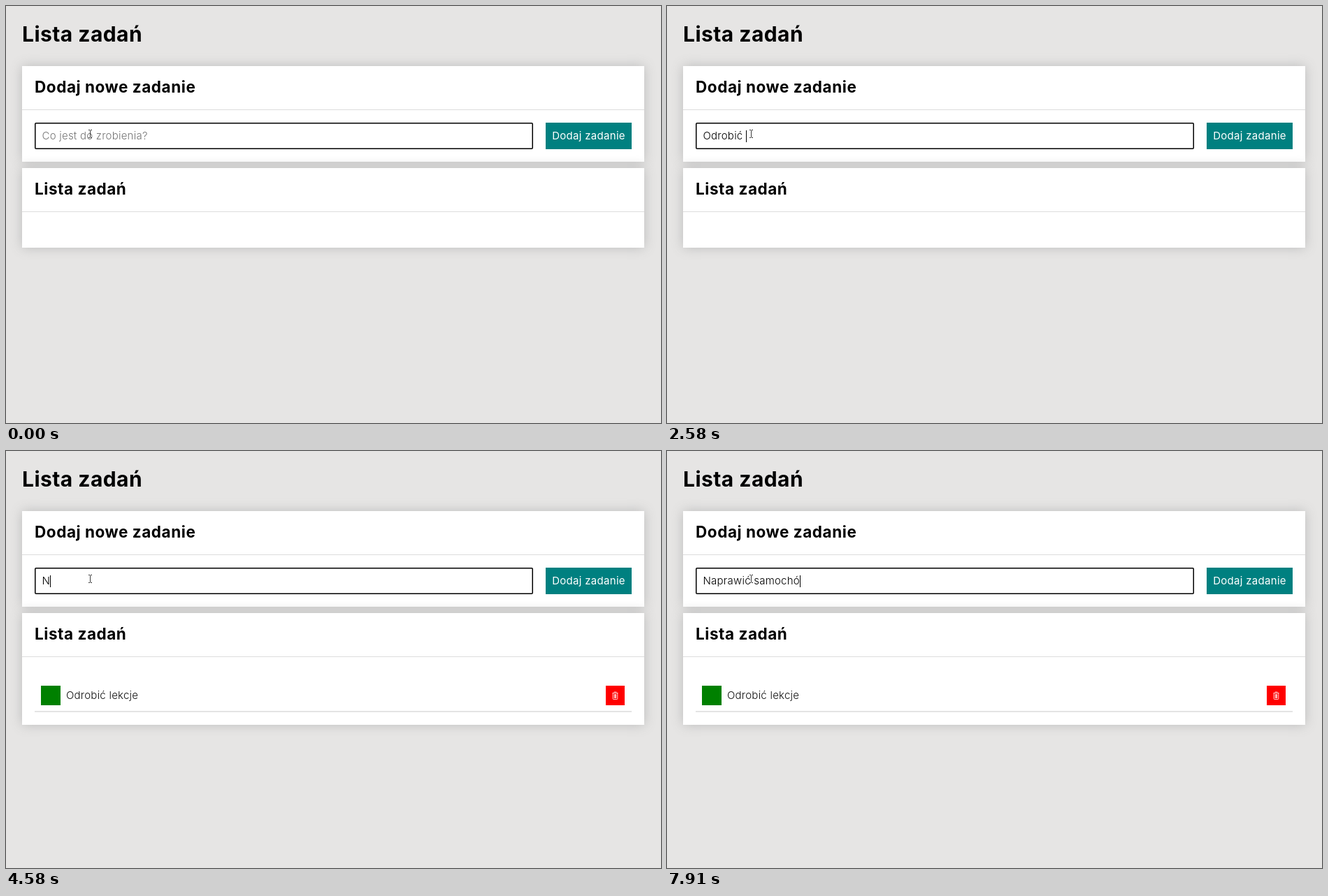
Animation of 937x597 px, one loop 8000 ms. Source, as an HTML page:

```html
<!DOCTYPE html>
<html lang="pl">
<head>
<meta charset="utf-8">
<title>Lista zadań</title>
<style>
  html, body { margin: 0; width: 100%; height: 100%; overflow: hidden; background: #e6e5e4; }
  body { position: relative; font: 300 15px Inter, sans-serif; letter-spacing: .23px; color: #000; }
  body *, h1, h2 { box-sizing: border-box; margin: 0; white-space: pre; }
  h1, section, .abs { position: absolute; }
  h1 { left: 23px; top: 20px; font-size: 30px; font-weight: 700; line-height: 41px; letter-spacing: .45px; }
  section { left: 23px; width: 890px; background: #fff; box-shadow: 0 0 16px #bbb; }
  h2 { height: 63px; padding-left: 18px; border-bottom: 1px solid #ddd;
       font-size: 22.5px; font-weight: 700; line-height: 60px; letter-spacing: .55px; }
  #field { left: 18px; top: 81px; width: 713px; height: 38px; padding: 2px 0 0 10.5px;
           border-radius: 2px; box-shadow: inset 0 0 0 1.5px #000; line-height: 33px; }
  #caret { display: inline-block; width: 1px; height: 17px; margin-right: -1px;
           vertical-align: -4px; background: #000; }
  #hint { left: 10.5px; top: 2px; color: #757575; }
  #add { left: 749px; top: 81px; width: 123px; height: 38px; background: teal; color: #fff;
         font-weight: 400; line-height: 37px; text-align: center; letter-spacing: .3px; }
  #item { left: 18px; top: 95px; width: 854px; height: 47px; border-bottom: 2px solid #e4e4e4; }
  .box { top: 9px; width: 28px; height: 28px; }
  #item span { left: 45px; top: 9px; line-height: 28px; color: #111; }
  #pointer { left: 116px; top: 176px; mix-blend-mode: difference; }
</style>
</head>
<body>
<h1>Lista zadań</h1>
<section style="top:86px;height:137px"><h2>Dodaj nowe zadanie</h2><div id="field" class="abs"><span id="typed"></span><i id="caret"></i><span id="hint" class="abs">Co jest do zrobienia?</span></div><div id="add" class="abs">Dodaj zadanie</div></section>
<section id="list" style="top:232px"><h2>Lista zadań</h2><div id="item" class="abs"><div class="abs box" style="left:9px;background:green"></div><span class="abs">Odrobić lekcje</span><svg class="abs box" style="left:817px;width:27px;background:red" viewBox="0 0 27 28" fill="none" stroke="#fff"><path d="M9.5 10.5h8M11.5 9h4M10.2 11v7.5q0 1 1 1h4.6q1 0 1-1V11M12.3 12v6M13.5 12v6M14.7 12v6" stroke-width=".8"/></svg></div></section>
<svg id="pointer" class="abs" width="8" height="14" fill="none" stroke="#c4c4c4"><path d="M2 1.5h2M5 1.5h2M4.5 2v10M2 12.5h2M5 12.5h2"/></svg>
<script>
  const LOOP = 8000, ADDED = 3850;
  const el = id => document.getElementById(id);
  const typing = (text, times) => times.map((time, i) => [time, text.slice(0, i + 1), true]);

  // [start time, field text, caret visible]
  const steps = [
    [0, "", false], [390, "", true], [930, "", false],
    ...typing("Odrobić lekcje", [1190, 1390, 1590, 1720, 1990, 2120, 2450, 2580,
      2780, 2910, 3040, 3180, 3310, 3450]),
    [ADDED, "", true], [4510, "", false],
    ...typing("Naprawić samochó", [4580, 4710, 4840, 5040, 5510, 5640, 5770, 6180,
      6380, 6650, 6850, 7050, 7250, 7450, 7580, 7910])
  ];

  function draw(t) {
    const [, text, caret] = steps.filter(([time]) => time <= t).pop();
    const added = t >= ADDED;
    el("typed").textContent = text;
    el("caret").style.visibility = caret ? "visible" : "hidden";
    el("hint").style.display = text ? "none" : "block";
    el("item").style.display = added ? "block" : "none";
    el("list").style.height = added ? "160px" : "114px";
  }

  const start = performance.now();
  function frame() {
    draw((performance.now() - start) % LOOP);
    requestAnimationFrame(frame);
  }
  frame();
</script>
</body>
</html>
```
